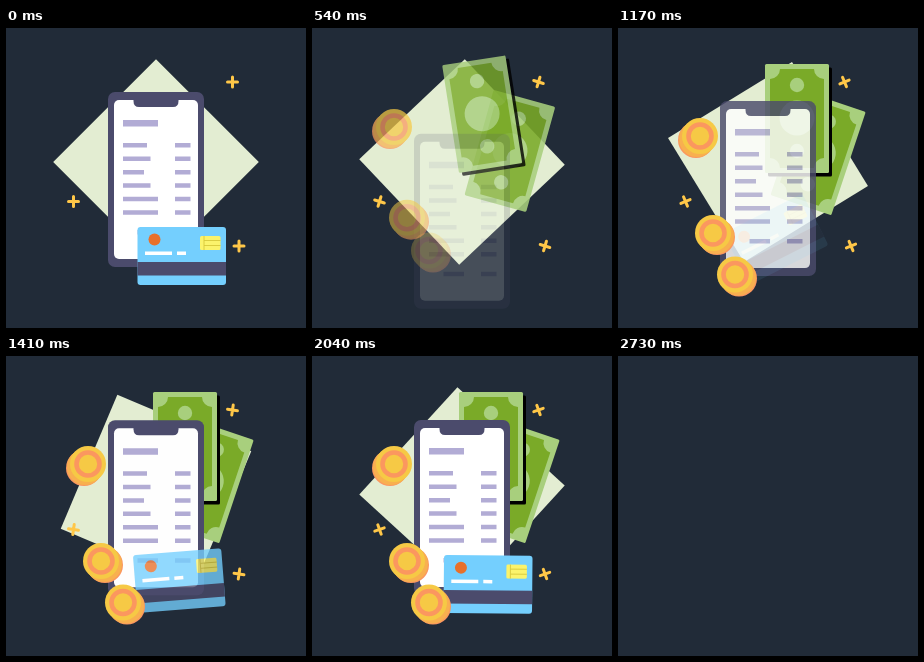
An HTML page for the animation above (2.76 s loop, 300x300 px).

```html
<!DOCTYPE html>
<html lang="en">
<head>
<meta charset="utf-8">
<title>Payment methods</title>
<style>
  html, body { margin: 0; width: 100%; height: 100%; overflow: hidden; background: #212b38; }
  svg { display: block; width: 100%; height: 100%; }
</style>
</head>
<body>
<svg viewBox="0 0 300 300">
  <defs>
    <!-- The origin is the bottom left corner, which is also the pivot. -->
    <g id="bill">
      <rect y="-109" width="64" height="109" rx="1.5" fill="#a8cf7d"/>
      <path fill="#7aaa28" d="M15-104H49A10 10 0 0 0 59-94V-15A10 10 0 0 0 49-5H15A10 10 0 0 0 5-15V-94A10 10 0 0 0 15-104Z"/>
      <g fill="#a8cf7d">
        <circle cx="32" cy="-55" r="17.5"/>
        <circle cx="32" cy="-88" r="7.2"/>
        <circle cx="32" cy="-22" r="7.2"/>
      </g>
    </g>
    <g id="coinFace">
      <circle r="18" fill="#f6c945"/>
      <circle r="11.5" fill="none" stroke="#fb975f" stroke-width="4.6"/>
    </g>
    <g id="coin">
      <circle cx="2" cy="2" r="18" fill="#fb975f"/>
      <circle cx="1" cy="1" r="18" fill="#f8b04f"/>
      <use href="#coinFace" x="-2" y="-2"/>
    </g>
    <path id="sparkle" d="M-5 0H5M0-5V5" stroke="#ffc748" stroke-width="3" stroke-linecap="round"/>
  </defs>

  <g id="scene">
    <rect id="diamond" x="-72.7" y="-72.7" width="145.4" height="145.4" fill="#e3edd2"/>
    <g id="sparkles">
      <use href="#sparkle"/><use href="#sparkle"/><use href="#sparkle"/>
    </g>
    <use id="backBill" href="#bill"/>
    <g id="frontBill">
      <rect x="3" y="-105.5" width="64" height="109" rx="1.5"/>
      <use href="#bill"/>
    </g>

    <g id="phone">
      <rect x="102" y="64" width="96" height="175" rx="7" fill="#4b4b6c"/>
      <rect x="108" y="72" width="84" height="159" rx="5" fill="#fff"/>
      <path d="M127.5 70H172.5V73Q172.5 79 167 79H133Q127.5 79 127.5 73Z" fill="#4b4b6c"/>
      <path id="receipt" fill="#b2acd5"/>
    </g>

    <g id="card">
      <rect y="-58" width="88.5" height="58" rx="3" fill="#74cffe"/>
      <rect y="-23" width="88.5" height="13.5" fill="#4b4b6c"/>
      <circle cx="17" cy="-45.5" r="6" fill="#e8702a"/>
      <rect x="62.5" y="-49" width="20.5" height="14" rx="1.5" fill="#fbf36b"/>
      <path d="M66.5-49V-35M66.5-44.5H83M66.5-39.5H83" stroke="#d8c93c" stroke-width=".9"/>
      <path d="M7.5-33.5H34.5V-30H7.5ZM39.5-33.5H48.5V-30H39.5Z" fill="#fff"/>
    </g>

    <use class="coin" href="#coin"/>
    <use class="coin" href="#coin"/>
    <use class="coin" href="#coin"/>
  </g>
</svg>
<script>
const LOOP = 2760, STEP = 30, ACTIVE = 2700;
const $ = id => document.getElementById(id);
const clamp = x => Math.min(1, Math.max(0, x));

// Timing curve with control points (x1, y1) and (x2, y2).
const bezier = (x1, y1, x2, y2) => x => {
  const at = (a, b, s) => 3 * (1 - s) ** 2 * s * a + 3 * (1 - s) * s * s * b + s ** 3;
  let lo = 0, hi = 1;
  for (let i = 0; i < 24; i++) {
    const mid = (lo + hi) / 2;
    if (at(x1, x2, mid) < x) lo = mid; else hi = mid;
  }
  return at(y1, y2, (lo + hi) / 2);
};
const settle = bezier(.25, .1, .25, 1);
const turn = bezier(1, 0, 0, 1);
const swing = x => (1 - Math.cos(Math.PI * x)) / 2;
const phase = (t, start, duration, ease) => ease(clamp((t - start) / duration));

// Presence, 0 to 1, of something that enters and later leaves.
const visit = (t, enter, enterTime, leave, leaveTime) =>
  phase(t, enter, enterTime, settle) - phase(t, leave, leaveTime, swing);

function place(el, x, y, angle = 0, opacity = 1, flip = 1) {
  el.setAttribute('transform', `translate(${x} ${y}) rotate(${angle}) scale(${flip} 1)`);
  el.setAttribute('opacity', clamp(opacity));
}

const bar = (x, y, w, h = 4.5) => `M${x} ${y}h${w}v${h}h${-w}z`;
const rows = [24, 27.5, 21, 27.5, 35, 35];
$('receipt').setAttribute('d', bar(117, 92, 35, 6.5) + bar(131.5, 202, 20.5) + bar(169, 202, 15.5) +
  rows.map((w, i) => bar(117, 115 + i * 13.45, w) + bar(169, 115 + i * 13.45, 15.5)).join(''));

const sparkles = [...$('sparkles').children];
const sparkleSpots = [[226.5, 54], [67.5, 173.5], [233, 218]];
const sparkleTurn = [[360, 0], [840, 45], [1170, 67], [1650, 130], [2300, 180]];

const coins = [...document.querySelectorAll('.coin')];
const coinRest = [
  { x: 80, y: 110, enter: 220, leave: 2315, flip: -1 },
  { x: 97, y: 207, enter: 312, leave: 2255, flip: 1 },
  { x: 119, y: 248.5, enter: 405, leave: 2067, flip: 1 }
];

function interpolate(points, t) {
  const next = points.findIndex(p => p[0] > t);
  if (next < 0) return points[points.length - 1][1];
  if (next === 0) return points[0][1];
  const [t0, a] = points[next - 1], [t1, b] = points[next];
  return a + (b - a) * (t - t0) / (t1 - t0);
}

function draw(t) {
  $('scene').setAttribute('visibility', t > ACTIVE ? 'hidden' : 'visible');

  place($('diamond'), 150, 134, 45 + 90 * turn(clamp(t / ACTIVE)));
  const spin = interpolate(sparkleTurn, t);
  sparkles.forEach((el, i) => place(el, ...sparkleSpots[i], spin));

  const back = visit(t, 98, 750, 2370, 300);
  place($('backBill'), 152.5, 167, 18.5 - 25 * (1 - back), back);
  const front = visit(t, 165, 750, 2310, 330);
  place($('frontBill'), 147, 145, -45 * (1 - front), front);

  const phone = 1 - phase(t, 210, 450, swing) + phase(t, 850, 620, settle);
  place($('phone'), 0, 50 * (1 - phone), 0, phone);

  const card = 1 - phase(t, 0, 300, swing) + phase(t, 1110, 620, settle);
  const overshoot = t > 1000 ? 2.3 * (1 - phase(t, 1700, 500, swing)) : 0;
  place($('card'), 131.5, 257, -32 * (1 - card) + overshoot, card);

  coins.forEach((el, i) => {
    const { x, y, enter, leave, flip } = coinRest[i];
    const shown = visit(t, enter, 750, leave, 280);
    place(el, x, y - 32 * (1 - shown), 0, shown, flip);
  });
}

function tick() {
  const t = performance.now() % LOOP;
  draw(Math.floor(t / STEP) * STEP);
  requestAnimationFrame(tick);
}
tick();
</script>
</body>
</html>
```
